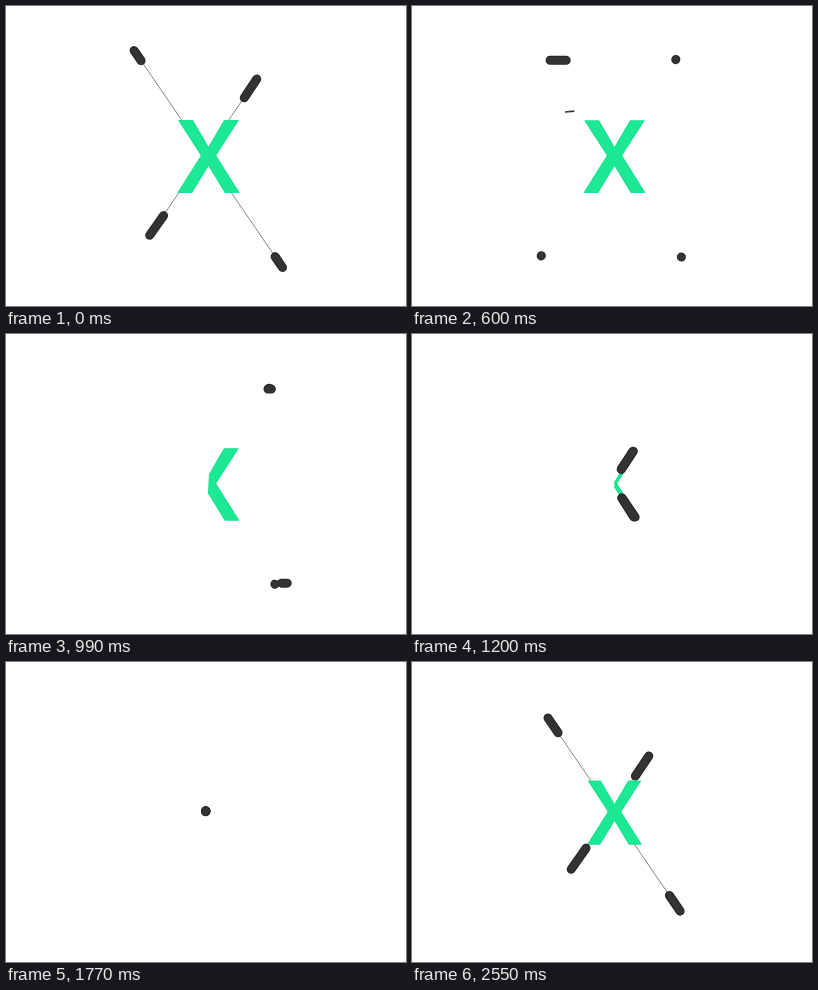
Write an HTML page with a canvas that moves like this. It is 400 px wide and 300 px high and loops after 2580 ms.

```html
<!DOCTYPE html>
<html lang="en">
<head>
<meta charset="utf-8">
<title>X loop</title>
<style>
  html, body { margin: 0; width: 100%; height: 100%; overflow: hidden; background: #fff; }
  canvas { display: block; width: 400px; height: 300px; }
</style>
</head>
<body>
<canvas id="stage"></canvas>
<script>
const LOOP = 2580, LEAD = 280, LAG = 27;
const GREEN = '#1de995', GREEN_EDGE = '#14de8b', DARK = '#333335', DARK_EDGE = '#272729';
const CX = 200, CY = 149.2;          // where the dots meet
const LX = 202.5, LY = 150.6;        // middle of the letter
const REACH = 114.3, STROKE = 14.5;

// Start times, counted from the lone dot at rest.
const SLIDE = 837, GATHER = 1341;

const canvas = document.getElementById('stage');
const ctx = canvas.getContext('2d');
const dpr = window.devicePixelRatio || 1;
canvas.width = 400 * dpr;
canvas.height = 300 * dpr;

const clamp = (v, a, b) => Math.min(b, Math.max(a, v));
const mix = (a, b, k) => a + (b - a) * k;

// Step response of a damped spring: 0 at rest, overshoots, settles at 1.
function spring(t, damping = .0063) {
  if (t <= 0) return 0;
  const w = .0123;
  return 1 - Math.exp(-damping * t) * (Math.cos(w * t) + damping / w * Math.sin(w * t));
}

// Odd arms are on the right, each beside the even one on its left.
const arms = [
  { dx: -.566, dy: -.824, size: 1, start: 87 },
  { dx: .555, dy: -.832, size: 1, start: 149 },
  { dx: -.575, dy: .818, size: 1.07, start: 149 },
  { dx: .563, dy: .826, size: 1.07, start: 87 }
];

function corner(i, t) {
  const a = arms[i], r = REACH * a.size * spring(t - a.start);
  return [CX + a.dx * r, CY + a.dy * r];
}

function place(i, t) {
  let [x, y] = corner(i, t);
  if (i % 2 === 0) x = mix(x, corner(i + 1, t)[0], spring(t - SLIDE - (i ? 53 : 0)));
  const g = spring(t - GATHER);
  return [mix(x, CX, g), mix(y, CY, g)];
}

function line(a, b, width, color) {
  ctx.beginPath();
  ctx.moveTo(...a);
  ctx.lineTo(...b);
  ctx.lineWidth = width;
  ctx.strokeStyle = color;
  ctx.stroke();
}

function trace(points) {
  ctx.beginPath();
  points.forEach(p => ctx.lineTo(...p));
  ctx.closePath();
}

// Right half of the X around its middle, with arms of horizontal width w.
const halfLetter = w => [
  [0, -.65 * w], [22.75 - w / 2, -36], [22.75 + w / 2, -36], [w / 2 + .2, -1],
  [23.5 + w / 2, 36], [23.5 - w / 2, 36], [0, .63 * w]
];
const mirror = points => points.map(([x, y]) => [-x, y]).reverse();

function drawLetter(t) {
  const gathering = t > GATHER;
  const w = STROKE - 10 * clamp((t - GATHER) / 135, 0, 1);
  const scale = spring(t - 102, .0085);
  if (scale <= 0 || t > GATHER + 165) return;
  ctx.save();
  if (gathering) {
    // only what lies between the incoming dots is left
    const top = place(1, t - LAG)[1], low = place(3, t - LAG)[1];
    ctx.beginPath();
    ctx.rect(150, top, 150, Math.max(0, low - top));
    ctx.clip();
  } else if (t > SLIDE) {
    // the left half is wiped off behind the sliding dots
    const top = Math.min(place(0, t)[0], 203), low = Math.min(place(2, t)[0], 202);
    trace([[top, 100], [300, 100], [300, 200], [low, 200], [low, 157], [top, 140]]);
    ctx.clip();
  }
  ctx.translate(LX, LY);
  ctx.scale(scale, scale);
  const half = halfLetter(w);
  trace(gathering ? half : half.concat(mirror(half)));
  ctx.fillStyle = GREEN;
  ctx.fill();
  ctx.clip();
  ctx.lineWidth = 1.6;
  ctx.strokeStyle = GREEN_EDGE;
  ctx.stroke();
  ctx.restore();
}

function drawThreads(t) {
  const w = .8 * clamp((t - 87) / 40, 0, 1) * clamp((430 - t) / 90, 0, 1);
  if (w <= 0) return;
  line(place(0, t), place(3, t), w, '#666');
  line(place(1, t), place(2, t), w, '#666');
}

function drawStreak(t, low) {
  const age = t - SLIDE - (low ? 53 : 0);
  const w = 1.6 * clamp((240 - age) / 95, 0, 1);
  const end = Math.min(290, place(low ? 2 : 0, t)[0] + (low ? 13 : 8));
  if (age < 0 || w <= 0 || end <= 153) return;
  const y = low ? 194.8 : 106;
  line([153, y], [end, y - .9], w, DARK);
}

function drawDots(t) {
  ctx.lineCap = 'round';
  for (const [width, color] of [[9, DARK_EDGE], [6.8, DARK]]) {
    arms.forEach((_, i) => {
      const [x, y] = place(i, t - LAG);
      line(place(i, t), [x + .01, y], width, color);
    });
  }
  ctx.lineCap = 'butt';
}

function draw(time) {
  const t = (time + LEAD) % LOOP;
  ctx.setTransform(dpr, 0, 0, dpr, 0, 0);
  ctx.fillStyle = '#fff';
  ctx.fillRect(0, 0, 400, 300);
  drawThreads(t);
  drawLetter(t);
  drawStreak(t, false);
  drawStreak(t, true);
  drawDots(t);
}

const start = performance.now();
function tick() {
  draw((performance.now() - start) % LOOP);
  requestAnimationFrame(tick);
}
tick();
</script>
</body>
</html>
```
